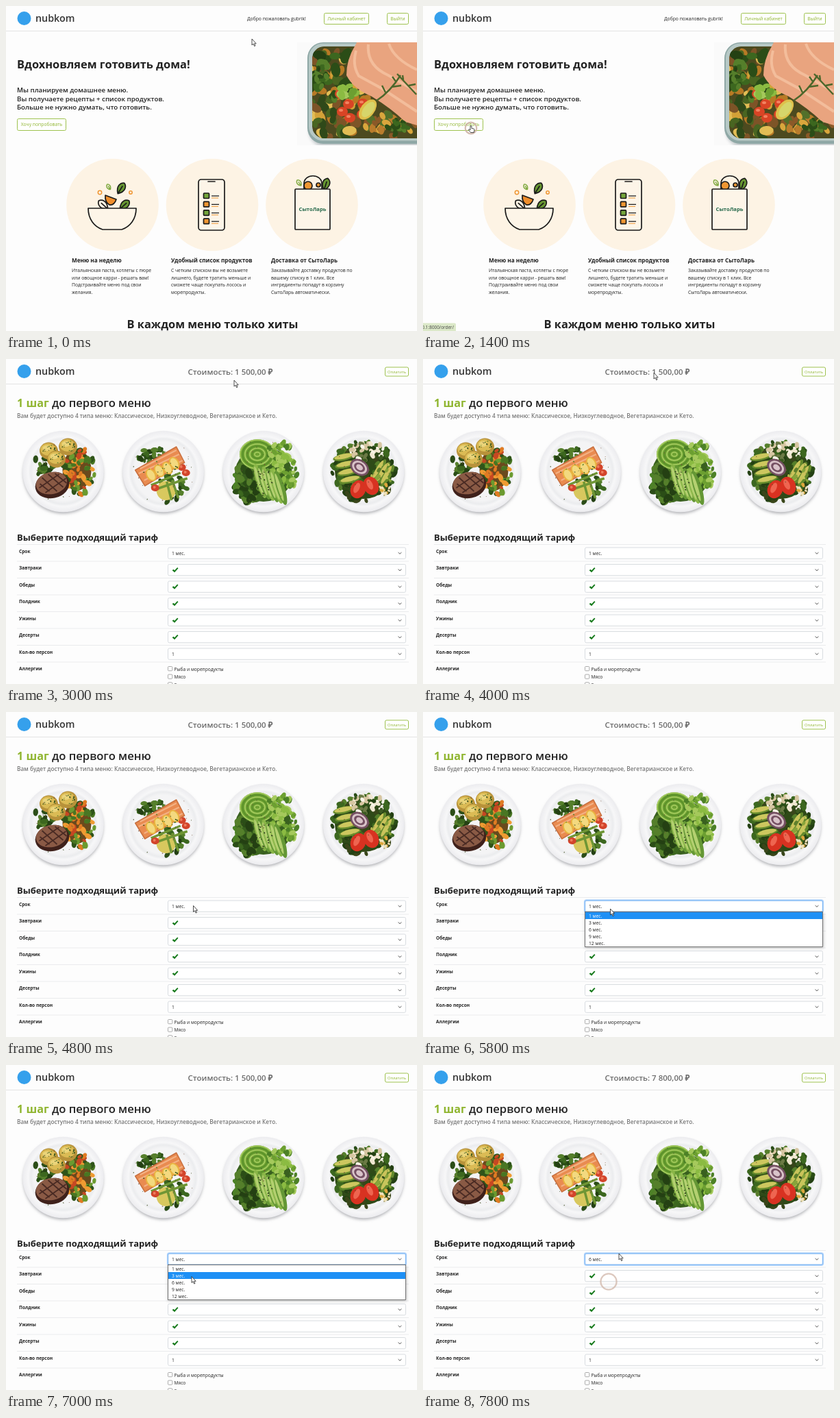
Animation, 600 px wide and 474 px high, one loop 8 s. Source, as an HTML page:

```html
<!DOCTYPE html>
<html lang="ru">
<head>
<meta charset="utf-8">
<style>
html, body { margin: 0; width: 100%; height: 100%; overflow: hidden; background: #fdfdfd; }
svg { display: block; width: 100vw; height: 100vh; font-family: "Open Sans", "Noto Sans", sans-serif; fill: #222; }
.bold { font-weight: 700; }
.semi { font-weight: 600; }
.mid { text-anchor: middle; }
.green { fill: #8fb52f; }
.ink { fill: none; stroke: #1a1a1a; stroke-width: 1.7; stroke-linejoin: round; stroke-linecap: round; }
.box { fill: #fff; stroke: #cfd3d8; stroke-width: .8; }
.button { fill: #fff; stroke: #94bb3c; stroke-width: .9; }
</style>
</head>
<body>
<svg viewBox="0 0 600 474" preserveAspectRatio="none">
  <defs>
    <radialGradient id="plate">
      <stop offset=".72" stop-color="#f4f4f5"/><stop offset=".8" stop-color="#ebecee"/>
      <stop offset=".86" stop-color="#f7f7f8"/><stop offset="1" stop-color="#ececef"/>
    </radialGradient>
    <filter id="soft"><feGaussianBlur stdDeviation="2.2"/></filter>
    <clipPath id="photo"><rect x="425" y="53" width="175" height="150"/></clipPath>
    <clipPath id="dish"><rect x="447" y="59" width="190" height="134" rx="17"/></clipPath>
  </defs>
  <g id="home"></g>
  <g id="order"></g>
  <g id="brand">
    <path d="M0 36.5H600" stroke="#dedede" stroke-width=".8"/>
    <circle cx="26.5" cy="18" r="10" fill="#35a0ec"/>
    <text x="43" y="22.8" font-size="14.3" class="semi" fill="#333">nubkom</text>
  </g>
  <g id="status">
    <path d="M0 462.5H46Q48 462.5 48 464.5V474H0Z" fill="#dbe8c8"/>
    <text x="45" y="470.6" font-size="6.4" text-anchor="end" fill="#444">0.1:8000/order/</text>
  </g>
  <circle id="ring" fill="none" stroke="#cdb0a3" stroke-width="2.2"/>
  <g id="cursor" fill="#fff" stroke="#222" stroke-width=".8" stroke-linejoin="round">
    <path id="arrow" d="M0 0V9L2 7.2 3.6 10.6 5 10 3.5 6.8H6.2Z"/>
    <path id="hand" d="M-1 0Q0-1 1 0V3.5L4 4Q5 4.2 5 5.2L4.3 9.5H-.5L-3.4 5.8Q-3.6 4.6-2.4 4.8L-1 6Z"/>
  </g>
</svg>
<script>
const $ = id => document.getElementById(id);
const SMALL = 6.75;

const text = (x, y, size, str, attrs = '') => `<text x="${x}" y="${y}" font-size="${size}" ${attrs}>${str}</text>`;
const lines = (x, y, step, size, rows, attrs) => rows.map((row, i) => text(x, y + i * step, size, row, attrs)).join('');
const rect = (x, y, w, h, rx, attrs) => `<rect x="${x}" y="${y}" width="${w}" height="${h}" rx="${rx}" ${attrs}/>`;
const path = (d, attrs) => `<path d="${d}" ${attrs}/>`;
const oval = (x, y, rx, ry, fill, turn = 0) =>
  `<ellipse rx="${rx}" ry="${ry}" fill="${fill}" transform="translate(${x} ${y}) rotate(${turn})"/>`;
const button = (x, y, w, h, size, label) =>
  rect(x, y, w, h, 2, 'class="button"') + text(x + w / 2, y + h / 2 + size * .36, size, label, 'class="mid green"');

// Seeded pieces of food spread over an ellipse
function scatter(x, y, rx, ry, count, size, colors, seed = 1) {
  const random = () => (seed = (seed * 16807 + 11) % 2147483647) / 2147483647;
  for (let i = 0; i < 5; i++) random();
  return Array.from({ length: count }, () => {
    const angle = random() * 2 * Math.PI, far = Math.sqrt(random()), r = size * (.6 + .6 * random());
    const color = colors[Math.floor(random() * colors.length)];
    return oval((x + rx * far * Math.cos(angle)).toFixed(1), (y + ry * far * Math.sin(angle)).toFixed(1),
      r.toFixed(1), (r * .65).toFixed(1), color, Math.round(random() * 180));
  }).join('');
}

const DARK = ['#2b4d17', '#3c671f', '#244013', '#557f2b'];
const FRESH = ['#6c9f31', '#8bbb42', '#4d8127', '#a5c95c'];
const AVOCADO = ['#88a43b', '#c5c75c', '#b3b64e', '#5f7f2c'];

function traybake() {
  return `<g clip-path="url(#photo)">
    ${rect(425, 53, 175, 150, 0, 'fill="#fafafa"')}
    ${rect(442, 60, 190, 146, 24, 'fill="#c9ced0" filter="url(#soft)"')}
    ${rect(440, 53, 190, 148, 23, 'fill="#8fa8a6"')}
    ${rect(442, 54.5, 190, 142, 21, 'fill="#b7c9c6"')}
    <g clip-path="url(#dish)">
      ${rect(447, 59, 190, 134, 17, 'fill="#4c4a1f"')}
      ${scatter(482, 128, 44, 72, 85, 9, ['#d3a137', '#b87a25', '#e2bd55', '#496521', '#2f4919', '#7d5427'], 17)}
      ${scatter(565, 175, 42, 18, 34, 8, ['#d9a63c', '#b97c2c', '#52702a', '#8b5928'], 8)}
      ${scatter(480, 98, 32, 38, 20, 10, DARK, 9)}
    </g>
    ${path('M510 57Q497 78 497 101Q507 121 534 132Q562 149 583 169L600 174V53H512Z', 'fill="#e9a47f"')}
    ${path('M511 65Q505 86 515 102L550 121 600 154M529 56Q526 87 558 101L600 125M559 55Q566 77 600 93', 'fill="none" stroke="#f3bd9b" stroke-width="4"')}
    ${[[488, 128], [500, 143], [520, 158], [502, 163], [521, 142], [491, 154]].map(([x, y]) => oval(x, y, 8, 7, '#d94425') + oval(x - 2, y - 2, 3, 2, '#f28260')).join('')}
    ${oval(528, 151, 17, 10, '#dec04b', -52)}${oval(529, 151, 13, 7, '#d6d56b', -52)}
    ${scatter(501, 126, 13, 10, 9, 8, FRESH, 6)}
    ${scatter(461, 101, 9, 17, 20, 5, DARK, 4)}${scatter(571, 177, 15, 11, 23, 5, DARK, 5)}
    ${path('M541 138Q561 125 576 101M554 126L549 116M563 118L577 116M569 110L564 103M571 99L599 129M580 108L579 101M588 116L598 114', 'fill="none" stroke="#4c672b" stroke-width="2.4"')}
  </g>`;
}

const leaf = (x, y, size, turn, attrs) =>
  `<path d="M0 ${size}C-${size} 0-${size * .5}-${size * .8} 0-${size}C${size * .5}-${size * .8} ${size} 0 0 ${size}M0 ${size}V-${size * .4}" transform="translate(${x} ${y}) rotate(${turn})" ${attrs}/>`;

function illustrations() {
  const ink = 'class="ink"', filled = color => `class="ink" style="fill:${color}"`;
  const outline = color => `fill="none" stroke="${color}" stroke-width="1.5"`;
  const bowl = leaf(142, 290, 9, -48, ink) + leaf(173, 290, 9, 48, filled('#679632')) +
    leaf(168, 266, 9, 32, filled('#679632')) + leaf(150, 264, 4.5, -32, outline('#81aa42')) +
    path('M145 276L161 282Q158 291 151 290Q144 286 145 276Z', filled('#ef8e2d')) +
    `<circle cx="137" cy="272" r="2.7" ${outline('#ef9632')}/><circle cx="182" cy="272" r="2.2" ${outline('#ef9632')}/>` +
    path('M120 295H190C190 311 181 322 169 326H141C129 322 120 311 120 295Z', filled('#fdf5e8'));
  const phone = rect(281, 253, 38, 74, 4, filled('#fdf5e8')) + path('M295 256H305', ink) +
    [0, 1, 2, 3].map(i => {
      const y = 273 + i * 12.4;
      return rect(288.5, y, 8, 7.5, 1, filled(i % 2 ? '#ef9632' : '#74a53a')) +
        path(`M300 ${y + 4}H311`, 'stroke="#222" stroke-width="1.3"') +
        path(`M300 ${y + 7}H310`, 'stroke="#ef9632" stroke-width="1"');
    }).join('');
  const bag = leaf(467, 260, 9, 18, filled('#679632')) + leaf(428, 258, 5, -35, outline('#81aa42')) +
    '<circle cx="441" cy="262" r="6" class="ink" style="fill:#ef9632"/><circle cx="456" cy="261" r="3" class="ink" style="fill:#ef9632"/>' +
    path('M435 267V259C435 244 461 244 461 259V267', ink) + rect(422, 267, 51, 59, 1, filled('#fdf5e8')) +
    text(447.5, 299, 7.6, 'СытоЛарь', 'class="mid bold" fill="#236749"');
  return [155.5, 301, 446.5].map(x => `<circle cx="${x}" cy="290" r="67.3" fill="#fdf3e4"/>`).join('') + bowl + phone + bag;
}

$('home').innerHTML = rect(0, 0, 600, 474, 0, 'fill="#fdfdfd"') +
  text(352, 21.3, SMALL, 'Добро пожаловать gubrik!') +
  button(464.5, 10.5, 65, 16, SMALL, 'Личный кабинет') + button(556.5, 10.5, 31, 16, SMALL, 'Выйти') +
  text(16, 91, 16.4, 'Вдохновляем готовить дома!', 'class="bold"') +
  lines(16, 126, 12.7, 9.75, ['Мы планируем домашнее меню.', 'Вы получаете рецепты + список продуктов.', 'Больше не нужно думать, что готовить.'], 'class="semi"') +
  button(16.5, 164.5, 71, 17, SMALL, 'Хочу попробовать') + traybake() + illustrations() +
  [
    [96, 'Меню на неделю', ['Итальянская паста, котлеты с пюре', 'или овощное карри - решать вам!', 'Подстраивайте меню под свои', 'желания.']],
    [241, 'Удобный список продуктов', ['С четким списком вы не возьмете', 'лишнего, будете тратить меньше и', 'сможете чаще покупать лосось и', 'морепродукты.']],
    [387, 'Доставка от СытоЛарь', ['Заказывайте доставку продуктов по', 'вашему списку в 1 клик. Все', 'ингредиенты попадут в корзину', 'СытоЛарь автоматически.']]
  ].map(([x, title, rows]) => text(x, 374, 8.2, title, 'class="bold"') + lines(x, 388, 10.5, SMALL, rows)).join('') +
  text(301.5, 469.5, 16.4, 'В каждом меню только хиты', 'class="bold mid"');

// Dishes are drawn around the plate centre
const lemon = (x, y) => oval(x, y, 7, 10, '#e9b440', -30) + oval(x, y, 5, 8, '#f3d97f', -30);
const DISHES = [
  () => scatter(-30, -8, 15, 15, 24, 5, DARK, 2) + oval(20, -2, 21, 30, '#6a4a1d') +
    scatter(24, 0, 23, 33, 75, 5, ['#e07b23', '#ef9b32', '#c64822', '#497623', '#2f5419', '#6b9a30'], 13) +
    [[-21, -30], [7, -36], [-10, -18]].map(([x, y]) => oval(x, y, 13.5, 12.5, '#b8923a') + oval(x - 1, y - 2, 11, 9, '#dbbb55') +
      oval(x - 3, y - 4, 6, 4, '#ead47a') + scatter(x, y, 10, 9, 14, 1.2, DARK, 7)).join('') +
    oval(-16, 20, 25, 19, '#3f211b', -12) + oval(-17, 17, 23, 16, '#8a5a45', -12) +
    path('M-34 18L-20 29M-31 9L-9 29M-22 4L0 23M-12 3L5 17M-35 24L-6 4M-26 31L4 10', 'fill="none" stroke="#492a23" stroke-width="1.7"'),
  () => scatter(-16, -24, 22, 12, 32, 5, DARK, 3) + scatter(10, 24, 24, 22, 38, 5, DARK, 5) +
    oval(4, 28, 14, 14, '#d8c85e') + path('M-18 20L25 2M-11 26L35 10M5 15L12 42M13 13L22 39', 'fill="none" stroke="#6f9635" stroke-width="3.5"') +
    [[33, 2], [-12, 24], [27, -6]].map(([x, y]) => oval(x, y, 6, 5, '#d3442b') + oval(x - 1, y - 1, 2, 2, '#ed7d5e')).join('') +
    path('M-41-2L19-36 31-13-27 21Z', 'fill="#e98b50" stroke="#c87040" stroke-width="1.5" stroke-linejoin="round"') +
    path('M-34-4L19-31M-36 3L23-25M-28 13L28-16', 'fill="none" stroke="#f3b184" stroke-width="2"') +
    lemon(-18, 5) + lemon(-6, -1) + lemon(6, -5) + lemon(16, -12) + scatter(-5, -6, 26, 18, 14, 1.2, DARK, 11),
  () => oval(0, 4, 42, 40, '#39601f') + scatter(-20, 14, 24, 30, 70, 7, [...DARK, '#4d8127'], 4) +
    scatter(30, 4, 19, 26, 70, 4.5, FRESH, 6) + oval(-9, -25, 26, 22, '#6fa233') +
    [0, 1, 2, 3, 4, 5, 6].map(i => `<ellipse cx="-9" cy="-25" rx="${25 - i * 3.5}" ry="${21 - i * 3}" fill="none" stroke="${i % 2 ? '#578e29' : '#a9cf62'}" stroke-width="1.6"/>`).join('') +
    scatter(24, -29, 17, 14, 40, 5, FRESH, 13) +
    [0, 1, 2, 3, 4, 5].map(i => oval(-5 + i * 6, 14 + i * 2, 6, 26, i % 2 ? '#649735' : '#8ab648', -17) + oval(-7 + i * 6, 13 + i * 2, 2.5, 21, '#b3d070', -17)).join('') +
    scatter(1, 15, 12, 21, 26, 1.2, ['#31411f'], 9),
  () => oval(0, 0, 42, 40, '#2f4a18') + scatter(0, 0, 46, 44, 110, 6, [...DARK, '#39461a'], 6) +
    [0, 1, 2, 3].map(i => oval(-29 + i * 3, -21 + i * 11, 16, 5, '#668c2c', -12) + oval(-29 + i * 3, -22 + i * 11, 14, 3.5, '#cdc75f', -12)).join('') +
    [0, 1, 2].map(i => oval(23 + i * 6, -2 + i * 4, 5, 18, '#648a2d', 30) + oval(21 + i * 6, -3 + i * 4, 3, 15, '#cac35b', 30)).join('') +
    scatter(28, 5, 18, 22, 14, 4, [...AVOCADO, '#2f4a18'], 8) +
    scatter(6, -29, 25, 14, 44, 4, ['#f0e7d1', '#d7c6a2', '#faf5e8', '#6b7a45', '#3c5a22'], 6) +
    [0, 1, 2, 3].map(i => oval(-6, -6, 15 - i * 3.2, 11 - i * 2.4, i % 2 ? '#d9c3c9' : '#755063', 35)).join('') +
    [[-8, 26, 25], [11, 21, -25]].map(([x, y, turn]) => oval(x, y, 11, 13.5, '#d83221', turn) + oval(x - 2, y - 2, 4, 8, '#ee6550', turn)).join('') +
    scatter(32, 25, 9, 8, 12, 3.5, ['#dda73c', '#eee0b8'], 4)
];
const plates = DISHES.map((dish, i) => `<g transform="translate(${83.5 + i * 146.2} 164)">
  <circle cy="3" r="58.5" fill="#b2b3b7" filter="url(#soft)"/>
  <circle r="59.3" fill="url(#plate)"/>
  ${dish()}${scatter(0, 0, 47, 47, 30, .8, ['#465229', '#765038'], i + 20)}</g>`).join('');

const ROW = 24.5;
const chevron = y => path(`M572.6 ${y - 1}l2.4 2.3 2.4-2.3`, 'fill="none" stroke="#444" stroke-width=".9"');
const tick = y => path(`M242.6 ${y + .8}l1.9-1.5 1.6 1.4 4-4.2 1.4 1.2-5.4 6Z`, 'fill="#167a1c"');
const rows = ['Срок', 'Завтраки', 'Обеды', 'Полдник', 'Ужины', 'Десерты', 'Кол-во персон', 'Аллергии'].map((label, i) => {
  const y = 283 + i * ROW;
  const field = i < 7 ? rect(236.5, y - 8, 347, 16.3, 2, 'class="box"') + chevron(y) : '';
  const value = i === 6 ? text(242, y + 2.5, SMALL, '1') : i > 0 && i < 6 ? tick(y) : '';
  return path(`M16 ${y - 12.5}H588`, 'stroke="#e6e8ea" stroke-width=".8"') + text(19, y - .4, 6.6, label, 'class="bold"') + field + value;
}).join('');
const allergies = ['Рыба и морепродукты', 'Мясо', 'Зерновые'].map((label, i) =>
  rect(236.5, 448.5 + i * 11.6, 6.2, 6.2, 1, 'fill="#fff" stroke="#888" stroke-width=".7"') + text(245.5, 454.6 + i * 11.6, 6.65, label)).join('');

const TERMS = ['1 мес.', '3 мес.', '6 мес.', '9 мес.', '12 мес.'];
const LIST_TOP = 292, ITEM = 10;

$('order').innerHTML = rect(0, 0, 600, 474, 0, 'fill="#fdfdfd"') +
  text(327.5, 23, 11.5, '', 'id="price" class="mid semi" fill="#6c6c6c"') + button(553.5, 12, 34, 13, 5.8, 'Оплатить') +
  text(16, 70, 16.2, '1 шаг', 'class="bold green"') + text(67, 70, 16.6, 'до первого меню', 'class="semi"') +
  text(16, 85.5, 8.25, 'Вам будет доступно 4 типа меню: Классическое, Низкоуглеводное, Вегетарианское и Кето.', 'class="semi" fill="#777"') +
  plates + text(16, 265, 13, 'Выберите подходящий тариф', 'class="bold"') + rows + allergies +
  `<g id="focus">${rect(236, 274.5, 348, 17.3, 2.5, 'fill="none" stroke="#b5d6fb" stroke-width="2.4"')}${rect(236.5, 275, 347, 16.3, 2, 'fill="none" stroke="#75b2f3" stroke-width=".9"')}</g>` +
  text(242, 285.6, SMALL, '', 'id="term"') +
  `<g id="list">${rect(236.5, 293, 348, 51, 0, 'fill="#777" opacity=".5" filter="url(#soft)"')}
    ${rect(236.5, 291.5, 347, 51, 0, 'fill="#fff" stroke="#555" stroke-width=".8"')}
    ${rect(237, LIST_TOP, 346, ITEM, 0, 'id="choice" fill="#1e90f5"')}
    ${lines(242, LIST_TOP + 7.6, ITEM, SMALL, TERMS, 'class="item"')}</g>`;

const LOOP = 8000, STEP = 200;
const ORDER_AT = 1600, OPEN_AT = 5200, CLOSE_AT = 7600;
const TRACK = [[0, 359, 48], [1000, 70, 175], [1800, 70, 175], [2400, 232, 165], [3000, 333, 31], [3400, 333, 31],
  [4000, 337, 20], [4600, 276, 261], [4800, 273.5, 282.5], [5000, 273.5, 287], [5800, 273.5, 287],
  [7000, 271, 308.5], [7200, 271, 316], [7400, 271, 316], [7800, 286, 275], [LOOP, 286, 275]];
const CLICKS = [[1200, 70, 178], [5000, 273.5, 287], [7400, 271, 316]];

function pointer(t) {
  const i = TRACK.findIndex(key => key[0] > t);
  const [t0, x0, y0] = TRACK[i - 1], [t1, x1, y1] = TRACK[i];
  const part = (t - t0) / (t1 - t0), ease = part * part * (3 - 2 * part);
  return [x0 + (x1 - x0) * ease, y0 + (y1 - y0) * ease];
}

const show = (id, on) => $(id).setAttribute('display', on ? 'inline' : 'none');

function draw(now) {
  const t = Math.floor(now % LOOP / STEP) * STEP;
  const [x, y] = pointer(t);
  const hovering = t >= 1000 && t <= 1800, paid = t >= CLOSE_AT;
  show('home', t < ORDER_AT);
  show('order', t >= ORDER_AT);
  show('status', t >= 1000 && t < 2200);
  show('focus', t >= OPEN_AT);
  show('list', t >= OPEN_AT && !paid);
  show('arrow', !hovering);
  show('hand', hovering);
  $('cursor').setAttribute('transform', `translate(${x} ${y})`);

  const chosen = Math.max(0, Math.floor((y - LIST_TOP) / ITEM));
  $('choice').setAttribute('y', LIST_TOP + chosen * ITEM);
  document.querySelectorAll('.item').forEach((item, i) => item.setAttribute('fill', i === chosen ? '#fff' : '#222'));
  $('term').textContent = paid ? TERMS[2] : TERMS[0];
  $('price').textContent = `Стоимость: ${paid ? '7 800' : '1 500'},00 ₽`;

  const click = CLICKS.find(([at]) => t >= at && t < at + 3 * STEP);
  show('ring', click);
  if (click) {
    const age = (t - click[0]) / STEP;
    $('ring').setAttribute('cx', click[1]);
    $('ring').setAttribute('cy', click[2]);
    $('ring').setAttribute('r', 5 + age * 3.3);
    $('ring').setAttribute('opacity', 1 - age * .15);
  }
}

const start = performance.now();
function play() {
  draw(performance.now() - start);
  requestAnimationFrame(play);
}
play();
</script>
</body>
</html>
```
